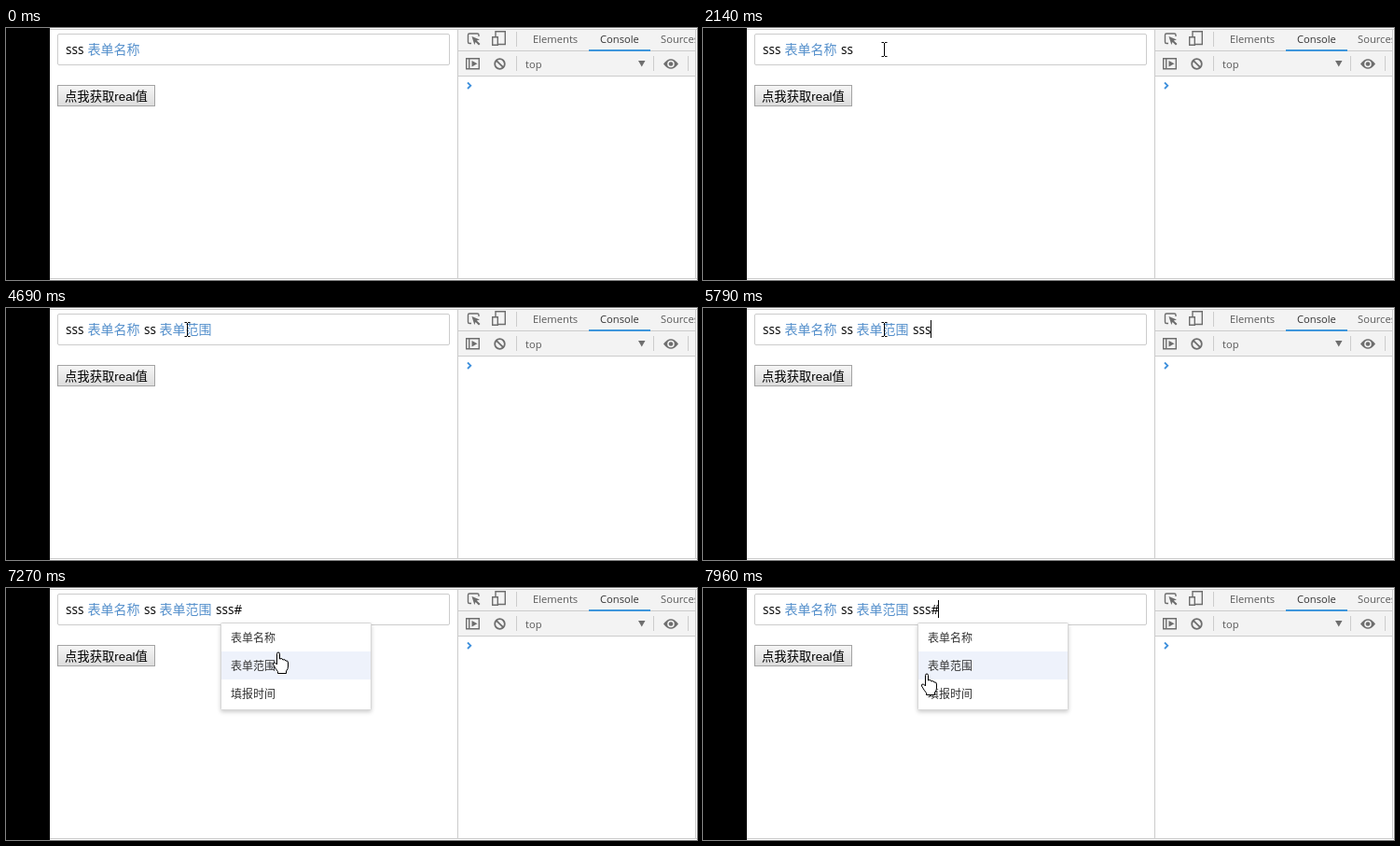
Recreate the animation shown at these times as an HTML page. Size 741 px wide and 270 px high, loop 8 s.

```html
<!DOCTYPE html>
<html lang="zh-CN">
<head>
<meta charset="utf-8">
<style>
  html, body { margin: 0; width: 100%; height: 100%; overflow: hidden; background: #fff; }
  svg { display: block; }
  text { white-space: pre; }
  .field { font: 13.6px "Open Sans", "Noto Sans CJK SC", sans-serif; }
  .tag { font: 14px "Noto Sans CJK SC", "Noto Sans CJK", sans-serif; fill: #5590cc; }
  .button { font: 13.333px "Liberation Sans", "Noto Sans CJK SC", "Noto Sans CJK", sans-serif; }
  .menu { font: 12px "Noto Sans CJK SC", "Noto Sans CJK", sans-serif; fill: #333; }
  .tools { font: 11.2px "Open Sans", sans-serif; fill: #5a5a5a; }
  .panel { filter: drop-shadow(0 2px 2px rgba(0, 0, 0, .2)); }
  .line { fill: none; stroke: #ccc; }
  .icon { fill: none; stroke: #6e6e6e; stroke-width: 1.4; }
  .solid { fill: #6e6e6e; }
  .pointer { fill: #fff; stroke: #000; stroke-linejoin: round; }
</style>
</head>
<body>
<svg width="741" height="270" viewBox="0 0 741 270">
  <defs>
    <linearGradient id="face" x2="0" y2="1">
      <stop stop-color="#f6f6f6"/><stop offset="1" stop-color="#dcdcdc"/>
    </linearGradient>
    <clipPath id="tools-clip"><path d="M485 0H739V270H485Z"/></clipPath>
  </defs>

  <!-- Page -->
  <path d="M0 0H47V270H0Z"/>
  <path class="line" d="M47 1.5H741M47 268.5H741"/>
  <rect class="line" x="55.5" y="6.5" width="420" height="33" rx="1.5"/>
  <text class="field" x="64" y="28">sss</text>
  <text class="tag" x="87.5" y="28">表单名称</text>
  <text class="field" id="typed1" x="148" y="28"></text>
  <text class="tag" id="tag2" x="164.5" y="28">表单范围</text>
  <text class="field" id="typed2" x="225" y="28"></text>
  <rect x="55.5" y="61.5" width="104" height="22" fill="url(#face)" stroke="#a3a3a3"/>
  <text class="button" x="63" y="78">点我获取real值</text>

  <!-- Developer tools -->
  <g clip-path="url(#tools-clip)">
    <path fill="#f3f3f3" d="M485 2H739V52H485Z"/>
    <path class="line" d="M485 24.5H739M485 51.5H739M547.5 4V20M547.5 30V46M694.5 30V46M731.5 30V46"/>
    <path fill="#3e96dc" d="M625 23H691V25H625Z"/>
    <g class="tools">
      <text x="565" y="16">Elements</text>
      <text x="637" y="16" fill="#333">Console</text>
      <text x="702" y="16">Sources</text>
      <text x="557" y="43">top</text>
    </g>
    <path class="icon" d="M499 16.5H497Q495.5 16.5 495.5 15V7.500Q495.500 6 497 6H505.500Q507 6 507 7.500V9"/>
    <path class="solid" d="M499.500 9L508 12.500L504.800 13.500L508.500 17L507 18.500L503.500 14.900L502.300 18Z"/>
    <path class="icon" d="M525 9V3.700H535.300V17.500H528M521.700 9.700H527.300V18.300H521.700Z"/>
    <path class="icon" d="M493.700 32.700H507.300V43.800H493.700ZM496.700 33V44"/>
    <path class="solid" d="M499.500 35L505.500 38.300L499.500 41.500Z"/>
    <circle class="icon" cx="529.500" cy="38.500" r="5.300" style="stroke-width:1.800"/>
    <path class="icon" d="M525.800 34.800L533.200 42.200" style="stroke-width:1.800"/>
    <path class="solid" d="M678 35H685.500L681.750 41.500Z"/>
    <path class="solid" d="M705 38.500Q713 28 721 38.500Q713 49 705 38.500Z"/>
    <circle cx="713" cy="38.500" r="3.800" fill="#f3f3f3"/>
    <circle class="solid" cx="713" cy="38.500" r="2.300"/>
    <path d="M495 58.500L498.300 61.750L495 65" fill="none" stroke="#3e90dc" stroke-width="1.800"/>
  </g>
  <path class="line" d="M484.500 2V268M739.500 2V268"/>

  <!-- Suggestion list -->
  <g id="menu">
    <rect class="panel" x=".5" y="37.500" width="161" height="93" rx="1" fill="#fff" stroke="#d6d6d6"/>
    <path id="highlight" fill="#eef2fb" d="M1 68H161V98H1Z"/>
    <g class="menu">
      <text x="11" y="58">表单名称</text>
      <text x="11" y="88">表单范围</text>
      <text x="11" y="118">填报时间</text>
    </g>
  </g>

  <path id="caret" d="M0 13H1V32H0Z"/>
  <g id="mouse">
    <path id="arrow" class="pointer" d="M.5.5V16.500L4.200 13L6.700 18.800L9.200 17.700L6.700 12H11.700Z"/>
    <path id="beam" d="M-.5-6.500H2M3-6.500H5.500M2.500-6V8M-.5 8.500H2M3 8.500H5.500" fill="none" stroke="#000"/>
    <path id="hand" class="pointer" d="M-1.500 13V1.500Q-1.500 0 0 0Q1.500 0 1.500 1.500V7Q4.500 5.500 4.800 8Q7.500 6.800 7.800 9Q10.500 8.300 10.500 11V15Q10.500 18 8.500 20V22.500H-.5V20.500Q-3 17.500-5.500 13Q-6 10.500-3.500 11Z"/>
  </g>
</svg>
<script>
const DURATION = 8000;
const REST = [192, 22];
const el = id => document.getElementById(id);
const show = (id, visible) => el(id).style.display = visible ? "" : "none";
const move = (id, x, y) => el(id).setAttribute("transform", `translate(${x} ${y})`);
const within = (t, from, to) => t >= from && t < to;

// Each entry holds until the next one starts.
const typing1 = [[0, ""], [1510, "s"], [1590, "ss"], [2540, "ss#"], [4690, "ss"]];
const typing2 = [[0, ""], [5470, "s"], [5620, "ss"], [5790, "sss"], [6570, "sss#"]];
const caretSpans = [[750, 1280], [1510, 2140], [2540, 3070], [4790, 5240],
                    [5470, 6320], [6570, 7100], [7630, DURATION]];
const wander = [[0, REST], [7040, [205, 27]], [7120, [235, 41]], [7190, [268, 57]],
                [7270, [292, 69]], [7340, [298, 88]], [7420, [301, 109]],
                [7500, [300, 102]], [7580, [299, 88]], [7650, [298, 76]],
                [7730, [297, 68]], [7880, [268, 80]], [7960, [240, 92]]];

const held = (steps, t) => steps.filter(([start]) => start <= t).pop()[1];
const textWidth = text => [...text].reduce((sum, c) => sum + (c === "#" ? 8.8 : 6.5), 0);

function mousePosition(t) {
  if (t >= 750) return held(wander, t);
  const progress = Math.min(1, Math.floor((t - 70) / 75) / 8);
  const eased = 1 - (1 - progress) ** 1.6;
  return [108 + 84 * eased, 250 - 228 * eased].map(Math.round);
}

function draw(t) {
  const first = held(typing1, t), second = held(typing2, t);
  el("typed1").textContent = first;
  el("typed2").textContent = second;
  show("tag2", t >= 4690);

  const firstMenu = within(t, 2670, 4690), secondMenu = t >= 6640;
  show("menu", firstMenu || secondMenu);
  show("highlight", secondMenu);
  move("menu", secondMenu ? 230 : 154, 0);

  show("caret", caretSpans.some(([from, to]) => within(t, from, to)));
  const caretX = t < 4690 ? 147 + textWidth(first) : 224 + textWidth(second);
  move("caret", Math.round(caretX), 0);

  const [x, y] = mousePosition(t);
  const onMenu = secondMenu && x >= 230 && y >= 38;
  const onField = !firstMenu && !secondMenu && y < 40;
  show("mouse", t >= 70);
  show("hand", onMenu);
  show("beam", onField);
  show("arrow", !onMenu && !onField);
  move("mouse", x, y);
}

const started = performance.now();
function tick() {
  draw((performance.now() - started) % DURATION);
  requestAnimationFrame(tick);
}
tick();
</script>
</body>
</html>
```
